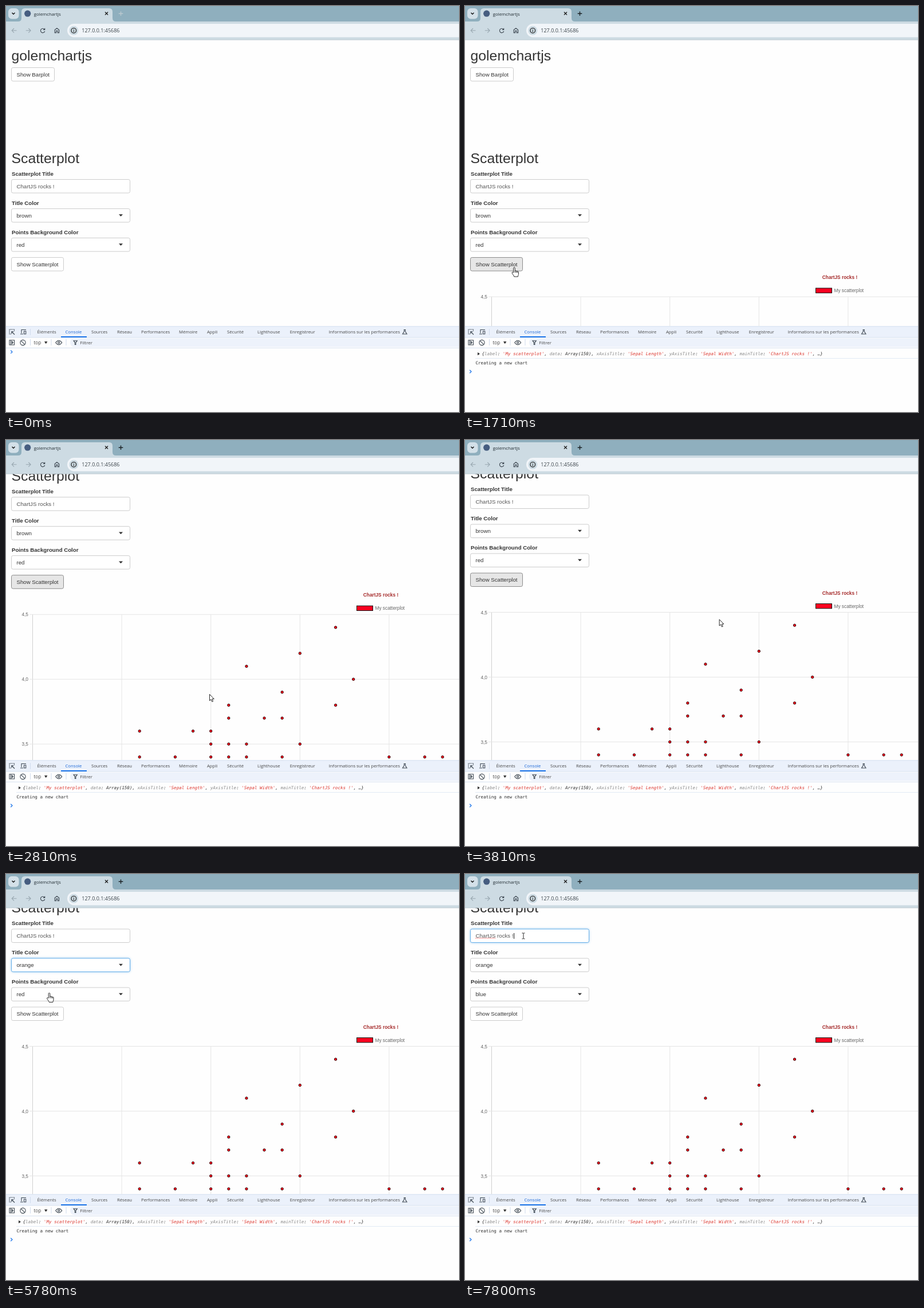
An HTML page that plays this animation: 791x708 px, repeating every 8 s.

```html
<!DOCTYPE html>
<html lang="fr">
<head>
<meta charset="utf-8">
<title>golemchartjs</title>
<style>
  html, body { margin: 0; width: 100%; height: 100%; overflow: hidden; background: #fefefe; }
  svg { display: block; width: 100vw; height: 100vh; }
  text { white-space: pre; }
  .page { font: 9.66px "Liberation Sans", Arial, sans-serif; fill: #333; }
  .h1 { font-size: 24.8px; }
  .label { font-weight: bold; }
  .small { font-size: 8.3px; fill: #666; }
  .ui { font: 7.7px "Open Sans", "Noto Sans", sans-serif; fill: #474747; }
  .mono { font: 7.56px "DejaVu Sans Mono", monospace; fill: #303030; }
  .key { fill: #8a8a8a; }
  .str { fill: #dc362e; }
  .icon { fill: none; stroke: #3c4650; stroke-width: 1.1; }
</style>
</head>
<body>
<svg id="stage" viewBox="0 0 791 708" preserveAspectRatio="none"></svg>
<script>
const DURATION = 8000;
const CTRL_H = 23.5, OPTION_H = 18;
const APPEAR = 490, CLICK = 1365, DRAW = 1705, EDIT = 7540;

// Each move eases the pointer to a place, optionally along a bowed path.
const MOVES = [
  { from: APPEAR, to: 1230, x: 86, y: 456, bow: 33 },
  { from: 1930, to: 2330, x: 355, y: 443 },
  { from: 3220, to: 3480, x: 661, y: 386 },
  { from: 3740, to: 3950, x: 190, y: 205, bow: 10 },
  { from: 4160, to: 4550, x: 110, y: 153 },
  { from: 4790, to: 5280, x: 95, y: 213 },
  { from: 5530, to: 5780, x: 75.5, y: 207.5 },
  { from: 6050, to: 6510, x: 88, y: 247 },
  { from: 6980, to: EDIT, x: 102, y: 108 }
];

const SELECTS = {
  color: { y: 353.5, options: ['brown', 'purple', 'orange', 'green'], pick: 2, open: 4550, close: 5280 },
  fill: { y: 404.5, options: ['red', 'blue', 'green', 'orange'], pick: 1, open: 6050, close: 6765 }
};

// Iris sepal lengths for each sepal width.
const POINTS = {
  4.4: [5.7], 4.2: [5.5], 4.1: [5.2], 4.0: [5.8], 3.9: [5.4], 3.8: [5.1, 5.7],
  3.7: [5.1, 5.3, 5.4], 3.6: [4.6, 4.9, 5], 3.5: [5, 5.1, 5.2, 5.5],
  3.4: [4.6, 4.8, 5, 5.1, 5.2, 5.4, 6, 6.2, 6.3]
};

const text = (x, y, str, attrs = '') => `<text x="${x}" y="${y}" ${attrs}>${str}</text>`;
const rect = (x, y, w, h, fill, attrs = '') =>
  `<rect x="${x}" y="${y}" width="${w}" height="${h}" fill="${fill}" ${attrs}/>`;
const line = (x1, y1, x2, y2, color, attrs = '') =>
  `<path d="M${x1} ${y1}L${x2} ${y2}" stroke="${color}" ${attrs}/>`;
const icon = (d, attrs = '') => `<path class="icon" d="${d}" ${attrs}/>`;

const box = (id, y, w) => rect(9.5, y, w, CTRL_H, '#fff', `id="${id}" rx="2.7" stroke="#ccc"`);
const button = (id, y, w, label) => box(id, y, w) + text(18.5, y + 15.2, label);
const field = (id, y, label, value) =>
  text(10, y - 7, label, 'class="label"') +
  rect(9.5, y, 207, CTRL_H, '#66afe9', `id="${id}Glow" rx="3" opacity=".75" filter="url(#glow)"`) +
  box(id, y, 207) + text(18.5, y + 15.2, value, `id="${id}Value" fill="#555"`);
const select = (id, label) => {
  const { y, options } = SELECTS[id];
  return field(id, y, label, options[0]) + `<path id="${id}Caret" fill="#333"/>`;
};
const dropdown = id => {
  const { y, options } = SELECTS[id], top = y + CTRL_H + 1;
  return `<g id="${id}List">` +
    rect(9.5, top + 4, 207, 77, '#000', 'opacity=".17" filter="url(#glow)"') +
    rect(9.5, top, 207, 77, '#fff', 'rx="2.7" stroke="#ccc"') +
    options.map((o, i) => rect(10, top + 3 + i * OPTION_H, 206, OPTION_H, '#337ab7', `id="${id}Bg${i}"`) +
      text(18.5, top + 15.4 + i * OPTION_H, o, `id="${id}Opt${i}"`)).join('') + '</g>';
};

const chartX = v => 46.5 + (v - 4) * 311.2;
const chartY = v => 507 + (4.5 - v) * 226;
const BASE_Y = chartY(2);

function chart() {
  let s = '';
  for (let v = 4; v <= 6; v += 0.5)
    s += line(chartX(v), 507, chartX(v), 770, v === 4 ? '#cfcfcf' : '#e5e5e5');
  for (const v of [4.5, 4, 3.5])
    s += line(41, chartY(v), 791, chartY(v), '#e5e5e5') +
      text(39, chartY(v) + 3, v.toFixed(1).replace('.', ','), 'class="small" text-anchor="end"');
  s += text(654.5, 476, 'ChartJS rocks !', 'class="small" style="font-weight:bold;fill:#a52a2a" text-anchor="middle"');
  s += rect(612.5, 492, 28, 8.3, '#fa0020', 'stroke="#111"') + text(644.5, 499, 'My scatterplot', 'class="small"');
  for (const [w, lengths] of Object.entries(POINTS))
    for (const l of lengths)
      s += `<circle cx="${chartX(l)}" data-y="${chartY(w)}" r="2.2" fill="#f5001e" stroke="#200" stroke-width=".9"/>`;
  return `<g id="chart">${s}</g>`;
}

const page = () => `<g id="page" class="page">` +
  text(9.5, 95.3, 'golemchartjs', 'class="h1"') + button('bar', 107.5, 75, 'Show Barplot') +
  text(9.5, 273.5, 'Scatterplot', 'class="h1"') +
  field('title', 302.5, 'Scatterplot Title', 'ChartJS rocks !') +
  `<g id="edit">${line(18.5, 318.5, 53, 318.5, '#e33', 'stroke-width="1.2" stroke-dasharray="1.4 1.4"')}
    ${line(85.6, 309.5, 85.6, 319.5, '#000', 'stroke-width=".9"')}</g>` +
  select('color', 'Title Color') + select('fill', 'Points Background Color') +
  button('plot', 438.5, 91, 'Show Scatterplot') +
  chart() + dropdown('color') + dropdown('fill') + '</g>';

const browser = () => '<g class="ui">' +
  rect(0, 0, 791, 28, '#8fafbe') + rect(0, 27, 791, 32, '#cddbe3') +
  '<path d="M21 27Q27 27 27 21V10Q27 4 33 4H180Q186 4 186 10V21Q186 27 192 27Z" fill="#cddbe3"/>' +
  rect(4, 4, 18.5, 18.5, '#d3e0e8', 'rx="6"') + icon('M10.5 11.8L13 14.3L15.5 11.8', 'style="stroke:#111;stroke-width:1.4"') +
  '<circle cx="37.7" cy="13.2" r="5.6" fill="#465d80"/>' +
  text(48.7, 16.6, 'golemchartjs', 'style="font-size:7.8px;fill:#1f2a30"') +
  icon('M173 10.6L178 15.6M178 10.6L173 15.6', 'style="stroke:#222;stroke-width:1.4"') +
  '<path id="plus" d="M200.5 9.5V17M196.7 13.2H204.3" stroke-width="1.4"/>' +
  '<g class="icon" style="stroke:#98a7b0"><path d="M18.5 42.8H10.5M14 39L10.2 42.8L14 46.6"/>' +
  '<path d="M34.8 42.8H42.8M39.3 39L43.1 42.8L39.3 46.6"/></g>' +
  icon('M67 40.6A3.7 3.7 0 1 0 67.7 44M67.7 38.7V41.4H65') +
  icon('M85.2 46.6V41.6L88.9 38.7L92.6 41.6V46.6H90.2V43.4H87.6V46.6Z') +
  rect(107, 31, 700, 23.5, '#f1f5f9', 'rx="11.7"') +
  '<circle cx="118.3" cy="42.8" r="8" fill="#cddbe3"/>' +
  '<circle class="icon" cx="118.3" cy="42.8" r="4.3" style="stroke:#222;stroke-width:1.2"/>' +
  icon('M118.3 42.2V45.2M118.3 40.2V41.2', 'style="stroke:#222"') +
  text(132.3, 46.1, '127.0.0.1:45686', 'style="font-size:9px;fill:#3d464c"') +
  line(0, 59, 791, 59, '#bccad2') + '</g>';

const TABS = {
  'Éléments': 54.5, 'Console': 103.5, 'Sources': 149, 'Réseau': 194, 'Performances': 236, 'Mémoire': 302,
  'Appli': 351, 'Sécurité': 386, 'Lighthouse': 439, 'Enregistreur': 495.7, 'Informations sur les performances': 563.7
};
const LOG = {
  label: "'My scatterplot'", data: 'Array(150)', xAxisTitle: "'Sepal Length'",
  yAxisTitle: "'Sepal Width'", mainTitle: "'ChartJS rocks !'"
};
const logEntry = ([key, value]) =>
  `<tspan class="key">${key}</tspan>: <tspan${value[0] === "'" ? ' class="str"' : ''}>${value}</tspan>, `;

const devtools = () => '<g class="ui">' +
  rect(0, 558.5, 791, 150, '#fefefe') + rect(0, 558.5, 791, 19.5, '#ebf1fb') +
  [558.8, 578, 596.3].map(y => line(0, y, 791, y, '#d6e2f0')).join('') +
  rect(112, 579.5, 690, 15, '#edf2fb', 'rx="7"') +
  icon('M9 572H6V564H14.5V567', 'stroke-dasharray="1.6 .8"') + icon('M10 568L15 573M9.8 571.5V567.8H13.5') +
  icon('M27 570.5V564.5H35M25 572H30M31.5 567H34.7V572H31.5Z') +
  line(42.5, 563, 42.5, 574, '#d0dcec') +
  Object.entries(TABS).map(([s, x]) => text(x, 571.4, s, s === 'Console' ? 'style="fill:#1a66d6"' : '')).join('') +
  rect(96, 576, 45, 2, '#1a73e8') +
  icon('M694.5 564.5H698M695.3 564.5V567.5L692.5 572H700L697.2 567.5V564.5') +
  icon('M6 582.8H14.5V591H6ZM8.5 582.8V591M10.5 585L12.5 587L10.5 589Z') +
  '<circle class="icon" cx="29.5" cy="587" r="4.6"/>' + icon('M26.3 583.8L32.7 590.2') +
  [42.5, 79, 105].map(x => line(x, 581, x, 592, '#d0dcec')).join('') +
  text(48.5, 589.9, 'top', 'style="font-size:8.1px"') + '<path d="M67 585H72.4L69.7 589.2Z" fill="#333"/>' +
  icon('M86.7 587Q92.2 579.5 97.7 587Q92.2 594.5 86.7 587Z') + '<circle class="icon" cx="92.2" cy="587" r="1.6"/>' +
  icon('M118 583.7H124.3L121.9 586.8V590.5H120.4V586.8Z') + text(129.3, 589.9, 'Filtrer', 'style="font-size:7.9px"') +
  '<g id="log" class="mono"><path d="M22 604L26 606.6L22 609.2Z" fill="#333"/>' +
  text(29.5, 609.2, '{' + Object.entries(LOG).map(logEntry).join('') + '…}', 'font-style="italic"') +
  line(18, 614.5, 791, 614.5, '#e2eaf5') + text(18.5, 625.3, 'Creating a new chart') + '</g>' +
  '<path id="prompt" d="M8.2 600.5L11 603.2L8.2 605.9" fill="none" stroke="#1a73e8" stroke-width="1.2"/></g>';

const pointer = () =>
  '<g id="pointer" fill="#fff" stroke="#111" stroke-width=".9" stroke-linejoin="round">' +
  '<path id="arrow" d="M.5 .5V11.6L3 9.3L4.8 13.4L6.6 12.6L4.9 8.6H8.3Z"/>' +
  '<path id="hand" d="M-1.3 9V1.3a1.3 1.3 0 0 1 2.6 0V6.2C1.5 5.4 3.4 5.4 3.6 6.6C4 6 5.6 6.1 5.7 7.2' +
  'C6.3 6.8 7.5 7 7.5 8.2V11.5C7.5 13 6.6 13.5 6.4 16H-.2C-.4 14 -3.6 11.4 -4 9.2C-4 8 -2.6 7.6 -1.3 9Z' +
  'M1.3 6V9M3.6 6.6V9.2M5.7 7.2V9.4"/>' +
  '<path id="beam" fill="none" d="M-2.5 -5H-.6L0 -4.4L.6 -5H2.5M0 -4.4V4.4M-2.5 5H-.6L0 4.4L.6 5H2.5"/></g>';

document.getElementById('stage').innerHTML =
  '<defs><filter id="glow" x="-10%" y="-60%" width="120%" height="220%"><feGaussianBlur stdDeviation="2.2"/></filter></defs>' +
  rect(0, 0, 791, 708, '#fefefe') + page() + browser() + devtools() + pointer();

const $ = id => document.getElementById(id);
const set = (id, attr, value) => $(id).setAttribute(attr, value);
const show = (id, on) => set(id, 'visibility', on ? 'visible' : 'hidden');
const dots = [...document.querySelectorAll('#chart circle')];

const easeOut = (t, from, to, power = 1.5) =>
  1 - (1 - Math.min(1, Math.max(0, (t - from) / (to - from)))) ** power;

function pointerAt(t) {
  let x = 764, y = 432;
  for (const m of MOVES) {
    const f = easeOut(t, m.from, m.to);
    x += (m.x - x) * f;
    y += (m.y - y) * f + (m.bow || 0) * Math.sin(Math.PI * f);
  }
  return [x, y];
}

function focusAt(t) {
  if (t >= EDIT) return 'title';
  if (t >= SELECTS.fill.open) return 'fill';
  if (t >= SELECTS.color.open) return 'color';
  return t >= CLICK ? 'plot' : '';
}

function render(t) {
  const scroll = 206.5 * easeOut(t, 2347, 2845);
  const [x, y] = pointerAt(t);
  const py = y + scroll;
  const focus = focusAt(t), drawn = t >= DRAW;
  const over = (top, w, h = CTRL_H) => t >= APPEAR && x >= 9 && x <= 9.5 + w && py >= top && py <= top + h;

  set('page', 'transform', `translate(0 ${-scroll})`);
  set('plus', 'stroke', t >= CLICK ? '#1c2226' : '#bac8cf');
  show('log', drawn);
  show('chart', drawn);
  set('prompt', 'transform', `translate(0 ${drawn ? 34.3 : 0})`);

  const rise = easeOut(t, 1735, 2735, 4);
  for (const dot of dots) dot.setAttribute('cy', BASE_Y + (dot.dataset.y - BASE_Y) * rise);

  let onList = false, onSelect = false;
  for (const [id, s] of Object.entries(SELECTS)) {
    const open = t >= s.open && t < s.close, chosen = t >= s.close ? s.pick : 0;
    const top = s.y + CTRL_H + 1, cy = s.y + 11.7, dir = open ? -1 : 1;
    const inList = open && over(top, 207, 77);
    const active = inList ? Math.max(0, Math.min(3, Math.floor((py - top - 3) / OPTION_H))) : chosen;
    onList = onList || inList;
    onSelect = onSelect || over(s.y, 207);
    $(id + 'Value').textContent = s.options[chosen];
    set(id + 'Value', 'fill', '#333');
    set(id + 'Caret', 'd', `M197 ${cy - 2 * dir}H204L200.5 ${cy + 1.8 * dir}Z`);
    show(id + 'List', open);
    s.options.forEach((_, i) => {
      show(`${id}Bg${i}`, open && i === active);
      set(`${id}Opt${i}`, 'fill', i === active ? '#fff' : '#333');
    });
  }

  for (const id of ['title', 'color', 'fill']) {
    show(id + 'Glow', focus === id);
    set(id, 'stroke', focus === id ? '#66afe9' : '#ccc');
  }
  show('edit', focus === 'title');

  const onButton = !onList && over(438.5, 91);
  const pressed = t >= CLICK && t < CLICK + 115;
  set('plot', 'fill', pressed ? '#d4d4d4' : onButton || focus === 'plot' ? '#e6e6e6' : '#fff');
  set('plot', 'stroke', focus === 'plot' ? '#8c8c8c' : onButton ? '#adadad' : '#ccc');

  const kind = onList || onSelect || onButton ? 'hand' : over(302.5, 207) ? 'beam' : 'arrow';
  for (const k of ['arrow', 'hand', 'beam']) show(k, t >= APPEAR && k === kind);
  set('pointer', 'transform', `translate(${x} ${y})`);
}

const start = performance.now();
function tick() {
  render((performance.now() - start) % DURATION);
  requestAnimationFrame(tick);
}
tick();
</script>
</body>
</html>
```
